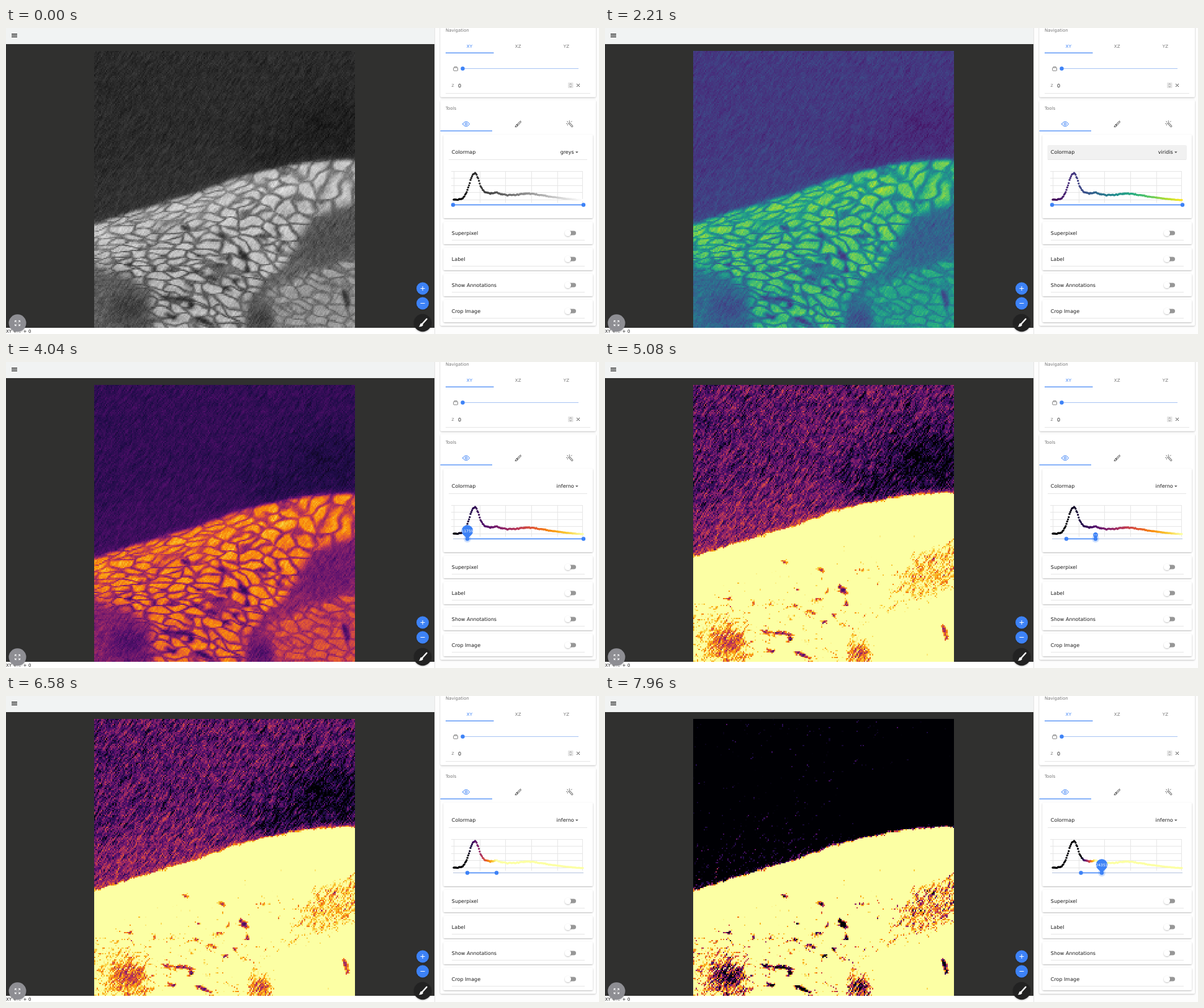
An HTML page with a canvas for the animation above (8 s loop, 955 px wide and 494 px high).

```html
<!DOCTYPE html>
<html lang="en">
<head>
<meta charset="utf-8">
<title>Slice viewer</title>
<style>
html, body { margin: 0; width: 100%; height: 100%; overflow: hidden; background: #fff; }
svg { position: absolute; left: 0; top: 0; display: block; }
canvas { position: absolute; left: 142px; top: 37px; width: 420px; height: 447px; image-rendering: pixelated; }
text { font-family: "DejaVu Sans", sans-serif; font-size: 8px; fill: #1c1c1c; text-rendering: geometricPrecision; white-space: pre; }
.small { font-size: 7px; }
.dim { fill: #757575; }
.rule { stroke: #e6e6e6; stroke-width: 1; }
.blue { fill: #3d82f6; }
.card { fill: #fff; filter: url(#shadow); }
.icon { fill: none; stroke: #444; stroke-width: 1; stroke-linecap: round; stroke-linejoin: round; }
</style>
</head>
<body>
<svg id="ui" width="955" height="494" viewBox="0 0 955 494">
  <defs>
    <filter id="shadow" x="-20%" y="-20%" width="140%" height="150%">
      <feDropShadow dx="0" dy="1" stdDeviation="1.3" flood-opacity=".28"/>
    </filter>
    <filter id="deep" x="-20%" y="-20%" width="140%" height="140%">
      <feDropShadow dx="0" dy="2" stdDeviation="3" flood-opacity=".36"/>
    </filter>
    <clipPath id="menuClip"><rect x="828" y="211" width="125" height="279" rx="2"/></clipPath>
  </defs>

  <rect width="690" height="26" fill="#f1f3f3"/>
  <path d="M9 9.9h9M9 12.2h9M9 14.5h9" stroke="#111" stroke-width="1.1"/>
  <rect y="26" width="690" height="458" fill="#30302f"/>
  <text class="small" x="0" y="492.3">XY + ':' + 0</text>

  <rect x="690" width="265" height="494" fill="#fdfdfd"/>
  <path d="M690.5 0V494" stroke="#e4e4e4"/>

  <g filter="url(#shadow)">
    <circle class="blue" cx="671" cy="420.5" r="10"/>
    <circle class="blue" cx="671" cy="444.5" r="10"/>
    <circle cx="671" cy="476" r="14.2" fill="#212124"/>
    <circle cx="18.5" cy="476.3" r="14" fill="#8e8e93"/>
  </g>
  <path d="M667.5 420.5h7M671 417v7M667.5 444.5h7" stroke="#fff"/>
  <path d="M677.5 469.8l-6.3 7" stroke="#fff" stroke-width="2.4" stroke-linecap="round"/>
  <path d="M669.3 476.6q2.6.6 2.4 3q-1.4 3.4-7 2.6q2-1.200 2-3.200q.6-2 2.600-2.400z" fill="#fff"/>
  <path d="M14.500 475v-2.600h2.600M14.500 472.400l2.800 2.800M22.500 475v-2.600h-2.600M22.500 472.400l-2.800 2.800M14.500 478v2.600h2.600M14.500 480.600l2.800-2.800M22.500 478v2.600h-2.600M22.500 480.600l-2.800-2.800" fill="none" stroke="#fff" stroke-width=".9"/>

  <rect class="card" x="699.5" y="-20" width="250.500" height="131.500" rx="2"/>
  <text class="small dim" x="708" y="6">Navigation</text>
  <g class="small" text-anchor="middle" letter-spacing=".2">
    <text class="small blue" x="746.400" y="31.600">XY</text>
    <text class="small dim" x="824.800" y="31.600">XZ</text>
    <text class="small dim" x="902.500" y="31.600">YZ</text>
  </g>
  <rect class="blue" x="708" y="39.600" width="77.500" height="1.200"/>
  <rect x="720.700" y="64" width="6.800" height="5" rx=".8" fill="none" stroke="#777" stroke-width=".9"/>
  <path d="M722 64v-1.300h4.200V64" fill="none" stroke="#777" stroke-width=".8"/>
  <path d="M735 65.500H922" stroke="#a9c4f3"/>
  <circle class="blue" cx="735.500" cy="65.500" r="3.200"/>
  <text class="dim" x="717.500" y="95" style="font-size:6px">Z</text>
  <text x="728" y="95.500">0</text>
  <rect x="905" y="88" width="8.500" height="9" rx="1" fill="#e6e6e6"/>
  <path d="M907.700 91.500l1.600-1.700 1.600 1.700M907.700 93.700l1.600 1.700 1.600-1.700" fill="none" stroke="#777" stroke-width=".7"/>
  <path d="M919 90l5 5M924 90l-5 5" stroke="#333" stroke-width=".9"/>
  <path class="rule" d="M708 105.500H941"/>

  <rect class="card" x="699.500" y="116.500" width="250.500" height="364" rx="2"/>
  <text class="small dim" x="708" y="132">Tools</text>
  <path class="icon" style="stroke:#3d82f6" d="M735.500 155q5.500-8 11 0q-5.500 8-11 0z"/>
  <circle class="icon" style="stroke:#3d82f6" cx="741" cy="155" r="1.700"/>
  <path class="icon" d="M828.700 150.300q1.300.6.300 1.900l-4.500 5-1.500-1.300 4.600-5.100zM822.700 156.200q1.600.6 1.200 2.200q-1.200 1.700-4 1.200q1-.800 1-2q.5-1.400 1.800-1.400z"/>
  <path class="icon" d="M906.300 153.700l1.200-1.200 5.500 6-1.200 1.200zM904 151l.8.8M907.300 150v1M903 154.300h1M910.200 151.400l.7-.7M904.200 156.800l.7-.7"/>
  <rect class="blue" x="699.500" y="165.500" width="83.500" height="1.200"/>

  <rect class="card" x="704.500" y="172" width="240.500" height="135" rx="2"/>
  <rect id="row" x="712.500" y="189" width="224.500" height="24" rx="2"/>
  <path class="rule" d="M713 212.500H936"/>
  <rect id="focus" class="blue" x="713.500" y="211.600" width="223" height="1.300"/>
  <text x="717.800" y="203.400">Colormap</text>
  <text id="choice" x="914.700" y="203.400" text-anchor="end">greys</text>
  <path d="M917 199.600h4.600l-2.300 2.400z" fill="#555"/>

  <path class="rule" d="M717 231.500H928M717 242.500H928M717 254.500H928M717 265.500H928M717 277.500H928M721.500 231V282M763.500 231V282M804.500 231V282M846.500 231V282M888.500 231V282M928.500 231V282"/>
  <g id="hist"></g>
  <path d="M720 285.500H930" stroke="#b4c3de"/>
  <path id="range" stroke="#3d82f6" stroke-width="1.300"/>
  <g id="thumbs"></g>

  <g id="toggles"></g>

  <g id="menu">
    <rect x="828" y="211" width="125" height="279" rx="2" fill="#fff" filter="url(#deep)"/>
    <g id="items" clip-path="url(#menuClip)"></g>
    <rect x="950.700" y="213" width="1.300" height="67" fill="#666"/>
  </g>
</svg>
<canvas id="slice" width="200" height="213"></canvas>

<script>
const W = 200, H = 213, CELL = 2.1, LOOP = 8000;
const $ = id => document.getElementById(id);
const clamp = (v, a = 0, b = 1) => Math.min(b, Math.max(a, v));
const mix = (a, b, k) => a + (b - a) * k;
const smooth = k => k * k * (3 - 2 * k);
const ramp = (t, a, b) => smooth(clamp((t - a) / (b - a)));
const pulse = (t, a, b, d = 150) => ramp(t, a, a + d) * (1 - clamp((t - b) / d));

function add(parent, tag, attrs, text) {
  const el = document.createElementNS("http://www.w3.org/2000/svg", tag);
  for (const k in attrs) el.setAttribute(k, attrs[k]);
  if (text) el.textContent = text;
  parent.appendChild(el);
  return el;
}
const set = (el, attrs) => { for (const k in attrs) el.setAttribute(k, attrs[k]); };

// ---- colour maps
const MAPS = {
  greys: ["000000", "ffffff"],
  viridis: ["440154", "472c7a", "3b518b", "2c718e", "21908d", "27ad81", "5cc863", "aadc32", "fde725"],
  inferno: ["000004", "1f0c48", "550f6d", "88226a", "ba3655", "e35933", "f98c0a", "f9c932", "fcffa4"]
};
for (const name in MAPS)
  MAPS[name] = MAPS[name].map(h => [0, 2, 4].map(i => parseInt(h.slice(i, i + 2), 16)));

function colour(name, v) {
  const stops = MAPS[name], p = clamp(v) * (stops.length - 1);
  const i = Math.min(Math.floor(p), stops.length - 2);
  return stops[i].map((c, n) => mix(c, stops[i + 1][n], p - i));
}

// ---- noise
function rnd(x, y, seed) {
  let h = Math.imul(x, 374761393) ^ Math.imul(y, 668265263) ^ Math.imul(seed, 974634541);
  h = Math.imul(h ^ (h >>> 13), 1274126177);
  h = Math.imul(h ^ (h >>> 15), 2246822519);
  return ((h ^ (h >>> 16)) >>> 0) / 4294967296;
}
function blobs(x, y, seed) {
  const i = Math.floor(x), j = Math.floor(y), u = smooth(x - i), v = smooth(y - j);
  return mix(mix(rnd(i, j, seed), rnd(i + 1, j, seed), u),
             mix(rnd(i, j + 1, seed), rnd(i + 1, j + 1, seed), u), v) - .5;
}
function grain(x, y) {
  let s = 0;
  for (let k = -2; k <= 2; k++)
    s += (rnd(x + Math.round(k * .55), y - k, 1) - .5) * [1, .8, .5][Math.abs(k)];
  return s / .48 * .85 + (rnd(x, y, 2) - .5) * 1.7;
}
// 0 on the walls between cells, 1 inside them
function cellular(x, y) {
  const i = Math.floor(x), j = Math.floor(y);
  let a = 9, b = 9;
  for (let n = -1; n <= 1; n++) for (let m = -1; m <= 1; m++) {
    const d = Math.hypot(i + m + rnd(i + m, j + n, 3) - x, j + n + rnd(i + m, j + n, 4) - y);
    if (d < a) { b = a; a = d; } else if (d < b) b = d;
  }
  return smooth(clamp((b - a) / .42));
}

// ---- tissue: red holds mean density, green the strength of the cell pattern
const EDGE = [[100, 330], [142, 317], [200, 299], [260, 281], [320, 262], [370, 243], [430, 228], [480, 218], [520, 215], [600, 212]];
const SPOTS = [
  [288, 323, 9, 4, .5], [347, 336, 9, 3, .6], [383, 368, 11, 5, .7], [415, 340, 10, 2, .6], [438, 360, 5, 3, 0],
  [198, 383, 6, 4, .2], [238, 389, 5, 2, .2], [265, 391, 9, 2, .2], [273, 437, 28, 4, .1], [320, 474, 18, 5, .4],
  [266, 466, 11, 4, .4], [333, 405, 9, 4, .4], [312, 394, 10, 3, .3], [352, 372, 14, 2, -.1], [342, 384, 13, 2, -.1],
  [370, 408, 9, 3, -.2], [402, 400, 8, 2, .3], [218, 355, 4, 2, .3], [432, 291, 3, 1, 0], [310, 368, 6, 2, .1],
  [547, 436, 4, 17, -.25], [298, 447, 5, 6, -.4], [388, 390, 4, 6, .2], [355, 421, 10, 3, .5]
];

function edgeAt(x) {
  const i = EDGE.findIndex(p => p[0] > x), [a, b] = [EDGE[i - 1], EDGE[i]];
  return mix(a[1], b[1], (x - a[0]) / (b[0] - a[0]));
}

function layers() {
  const cv = document.createElement("canvas");
  cv.width = W; cv.height = H;
  const c = cv.getContext("2d", { willReadFrequently: true });
  c.setTransform(1 / CELL, 0, 0, 1 / CELL, -142 / CELL, -37 / CELL);
  const ink = (mean, tex, blur) => {
    c.fillStyle = `rgb(${mean * 255},${tex * 255},0)`;
    c.filter = blur ? `blur(${blur}px)` : "none";
    c.beginPath();
  };
  const poly = (mean, tex, blur, pts) => { ink(mean, tex, blur); pts.forEach(p => c.lineTo(...p)); c.fill(); };
  const oval = (mean, tex, blur, x, y, rx, ry, turn = 0) => {
    ink(mean, tex, blur); c.ellipse(x, y, rx, ry, turn, 0, 7); c.fill();
  };
  ink(.168, 0, 0); c.fillRect(100, 0, 520, 520);
  oval(.1, 0, 13, 525, 160, 62, 44);
  oval(.125, 0, 10, 435, 205, 45, 24);
  poly(.2, 0, 13, [[90, 255], [330, 205], [410, 245], [90, 345]]);
  poly(.62, 1, .8, [...EDGE, [600, 520], [100, 520]]);
  poly(.67, .8, 5, [...EDGE.map(p => [p[0], p[1] + 9]), [600, 260], [440, 268], [320, 305], [100, 360]]);
  poly(.57, 1, 8, [[110, 385], [400, 375], [400, 520], [110, 520]]);
  poly(.4, .15, 2, [[590, 275], [500, 303], [478, 326], [462, 362], [438, 392], [400, 418], [420, 432], [480, 404], [590, 362]]);
  poly(.315, .05, 4, [[590, 280], [505, 305], [482, 332], [470, 385], [500, 380], [590, 345]]);
  poly(.53, .5, 2, [[418, 432], [480, 404], [590, 362], [590, 520], [440, 520]]);
  poly(.355, .15, 3, [[100, 382], [165, 392], [205, 402], [232, 425], [243, 520], [100, 520]]);
  oval(.215, 0, 7, 198, 455, 30, 22);
  poly(.36, .1, 2, [[388, 436], [410, 422], [424, 436], [442, 520], [380, 520]]);
  oval(.23, 0, 4, 410, 472, 18, 16);
  SPOTS.forEach(s => oval(.17, 0, 1, ...s));
  return c.getImageData(0, 0, W, H).data;
}

const field = (() => {
  const base = layers(), out = new Float32Array(W * H);
  for (let j = 0; j < H; j++) for (let i = 0; i < W; i++) {
    const n = j * W + i, mean = base[n * 4] / 255, tex = base[n * 4 + 1] / 255;
    const x = 142 + i * CELL, y = 37 + j * CELL;
    let v = mean;
    if (tex > .02) {
      const tilt = mix(-.25, .2, clamp((y - edgeAt(x)) / 130));
      const wx = x + blobs(x / 20, y / 14, 5) * 14;
      const wy = y - tilt * (x - 350) + blobs(x / 18, y / 14, 6) * 9;
      const depth = .36 + blobs(x / 40, y / 30, 7) * .16;
      v += tex * ((cellular(wx / 29, wy / 14) - .62) * depth + blobs(x / 16, y / 9, 8) * .08);
    }
    out[n] = v + grain(i, j) * (mean > .25 ? .036 : .026);
  }
  return out;
})();

const ctx = $("slice").getContext("2d"), img = ctx.createImageData(W, H);
let shownSlice = "", shownHist = "";
function drawSlice(name, lo, hi) {
  const key = [name, lo, hi].join();
  if (key === shownSlice) return;
  shownSlice = key;
  field.forEach((v, n) => {
    const c = colour(name, (v - lo) / (hi - lo));
    img.data.set([c[0], c[1], c[2], 255], n * 4);
  });
  ctx.putImageData(img, 0, 0);
}

// ---- histogram
const CURVE = [[720, 277.3], [730, 276.8], [736, 275], [741, 267], [745, 256], [749, 243], [752, 236], [755, 234], [757, 235], [760, 242], [764, 255], [768, 262], [773, 266], [780, 267], [790, 265.5], [797, 268], [806, 270], [825, 269], [838, 267.3], [850, 268], [862, 270], [875, 272], [890, 274], [905, 276], [931, 278]];
const BINS = 170;
const dots = Array.from({ length: BINS }, (_, n) => {
  const x = 721 + n / (BINS - 1) * 208, i = CURVE.findIndex(p => p[0] > x);
  const [a, b] = [CURVE[i - 1], CURVE[i]];
  const wob = (rnd(n, 0, 9) - .5) * (x < 875 ? 1.6 : .5);
  return add($("hist"), "circle", { cx: x, cy: mix(a[1], b[1], (x - a[0]) / (b[0] - a[0])) + wob, r: 1.65 });
});
function drawHist(name, lo, hi) {
  const key = [name, lo, hi].join();
  if (key === shownHist) return;
  shownHist = key;
  dots.forEach((d, n) => {
    const c = colour(name, (n / (BINS - 1) - lo) / (hi - lo));
    d.setAttribute("fill", `rgb(${c.map(Math.round)})`);
  });
}

// ---- range slider
const makeThumb = () => {
  const g = add($("thumbs"), "g", {});
  const halo = add(g, "circle", { class: "blue", cy: 285.5, r: 6, opacity: 0 });
  add(g, "circle", { class: "blue", cy: 285.5, r: 3.2 });
  const tag = add(g, "g", {});
  add(tag, "path", { class: "blue", d: "M0 285.200L-6.600 279.100A9.300 9.300 0 1 1 6.600 279.100Z" });
  const text = add(tag, "text", { y: 275, "text-anchor": "middle", style: "font-size:6px;fill:#fff" });
  return { g, halo, tag, text };
};
const thumbs = [makeThumb(), makeThumb()];
function drawThumb(th, x, glow, open) {
  set(th.g, { transform: `translate(${x} 0)` });
  set(th.halo, { opacity: .25 * glow });
  set(th.tag, { transform: `translate(0 284) scale(${open}) translate(0 -284)`, visibility: open > .01 ? "visible" : "hidden" });
  th.text.textContent = Math.floor(6679 + 46389 * (x - 720) / 210);
}

// ---- toggle cards and menu
["Superpixel", "Label", "Show Annotations", "Crop Image"].forEach((name, n) => {
  const g = add($("toggles"), "g", { transform: `translate(0 ${n * 42})` });
  add(g, "rect", { class: "card", x: 704.5, y: 313, width: 240.5, height: 36, rx: 2 });
  add(g, "text", { x: 717.8, y: 333.5 }, name);
  add(g, "path", { class: "rule", d: "M718 342.500H932" });
  add(g, "rect", { x: 902, y: 327.4, width: 16, height: 7.2, rx: 3.6, fill: "#979797" });
  add(g, "circle", { cx: 905, cy: 331, r: 5, fill: "#fff", filter: "url(#shadow)" });
});
const items = "greys viridis inferno magma plasma earth electric jet hsv hot cool spring".split(" ").map((name, n) => {
  const bg = add($("items"), "rect", { x: 828, y: 216 + n * 24, width: 122.7, height: 24 });
  add($("items"), "text", { x: 836, y: 230.8 + n * 24 }, name);
  return bg;
});
function drawMenu(t) {
  const open = t < 2250 ? ramp(t, 1220, 1470) * (1 - ramp(t, 1790, 1990))
                        : ramp(t, 2290, 2540) * (1 - ramp(t, 3120, 3320));
  set($("menu"), {
    opacity: open, visibility: open > .005 ? "visible" : "hidden",
    transform: `translate(890 230) scale(${mix(.75, 1, open)} ${mix(.56, 1, open)}) translate(-890 -230)`
  });
  const picked = t < 1790 ? 0 : t < 3100 ? 1 : 2;
  const hover = t < 1430 ? 0 : t < 2200 ? 1 : t < 2620 ? 0 : t < 2700 ? 1 : 2;
  items.forEach((bg, n) => set(bg, { fill: n === picked ? "#ebf3fe" : n === hover ? "#f5f5f5" : "#fff" }));
}

const mapAt = (t, late) => t < 1960 + late ? "greys" : t < 3300 + late ? "viridis" : "inferno";
const lowAt = t => t < 4150 ? 0 : t < 7150 ? .11 : .222;

function draw(t) {
  drawSlice(mapAt(t, 0), lowAt(t), t < 5040 ? 1 : .333);
  drawHist(mapAt(t, 90), lowAt(t - 170), t < 5300 ? 1 : .333);
  $("choice").textContent = t < 1830 ? "greys" : t < 3160 ? "viridis" : "inferno";

  const grey = .025 * ramp(t, 1040, 1200) + .03 * ramp(t, 1800, 2000);
  set($("row"), { opacity: grey * (1 - ramp(t, 3560, 3740)) });
  const focus = ramp(t, 1210, 1410) * (1 - ramp(t, 1820, 2020)) + ramp(t, 2290, 2490) * (1 - ramp(t, 3140, 3340));
  set($("focus"), { transform: `translate(825 0) scale(${focus} 1) translate(-825 0)` });
  drawMenu(t);

  const lo = 720 + 23 * ramp(t, 3840, 4020) + 23.5 * ramp(t, 6780, 7040);
  const hi = 930 - 140 * ramp(t, 4560, 4960) + 10 * ramp(t, 7640, 7900);
  set($("range"), { d: `M${lo} 285.500H${hi}` });
  drawThumb(thumbs[0], lo, pulse(t, 3740, 4320) + pulse(t, 6660, 7220), pulse(t, 3780, 4080) + pulse(t, 6730, 7090));
  drawThumb(thumbs[1], hi, pulse(t, 4440, 5700) + pulse(t, 7480, 9000), pulse(t, 4500, 4995) + pulse(t, 7560, 9000));
}

const start = performance.now();
function tick() {
  draw((performance.now() - start) % LOOP);
  requestAnimationFrame(tick);
}
tick();
</script>
</body>
</html>
```
